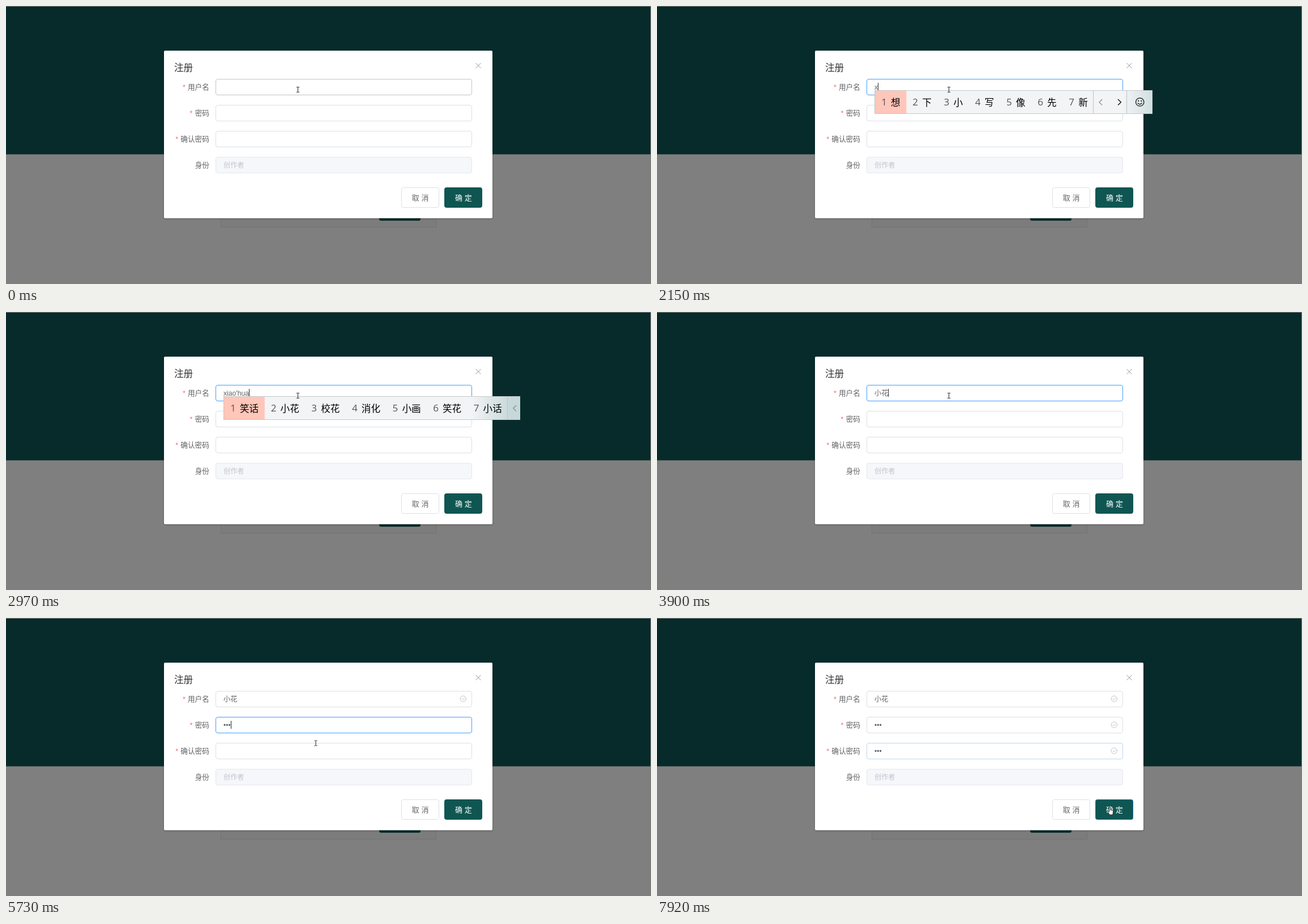
Animation of 1139 by 492 pixels, one loop 8000 ms. Source, as an HTML page:

```html
<!DOCTYPE html>
<html lang="zh-CN">
<head>
<meta charset="utf-8">
<title>注册</title>
<style>
  html, body { margin: 0; width: 100%; height: 100%; overflow: hidden; background: #7f7f7f; }
  svg { display: block; }
  text { font-family: Arial, "Liberation Sans", "Noto Sans CJK SC", "Noto Sans CJK", sans-serif; font-size: 12.2px; fill: #606266; white-space: pre; }
  .title { font-size: 16.6px; fill: #303133; }
  .label { font-size: 12.7px; text-anchor: end; }
  .star { font-size: 12.7px; fill: #f56c6c; }
  .btn { font-size: 13px; letter-spacing: 3.8px; }
  .num, .cand { font-family: "Open Sans", "Noto Sans CJK SC", "Noto Sans CJK", sans-serif; font-size: 17px; fill: #555; }
  .num { text-anchor: middle; }
  .cand { font-size: 16.6px; fill: #000; }
  .box { fill: #fff; stroke: #dcdfe6; }
  .line { fill: none; stroke-linecap: round; stroke-linejoin: round; }
  .tick { stroke: #c0c4cc; }
  .beam { stroke: #222; stroke-width: 1; fill: none; }
</style>
</head>
<body>
<svg id="stage" width="1139" height="492" viewBox="0 0 1139 492">
  <defs>
    <linearGradient id="acrylic" gradientUnits="userSpaceOnUse" x1="822" y1="0" x2="892" y2="0">
      <stop stop-color="#f3f4f6"/><stop offset="1" stop-color="#c6d8d9"/>
    </linearGradient>
    <clipPath id="barClip"><rect id="barEdge" x="384" y="149" height="42"/></clipPath>
    <filter id="shadow" x="-5%" y="-5%" width="110%" height="110%">
      <feDropShadow dx="0" dy="1" stdDeviation="1.5" flood-opacity=".35"/>
    </filter>
  </defs>

  <rect y="1" width="1138" height="261.5" fill="#072b2a"/>
  <rect x="379.5" y="340.5" width="380" height="51" fill="#7c7c7c" stroke="#737373"/>
  <rect x="659" y="350" width="73" height="30" rx="3" fill="#082b29"/>
  <rect x="279" y="79" width="580" height="296.5" rx="2" fill="#fff" filter="url(#shadow)"/>

  <text class="title" x="297" y="115.4">注册</text>
  <path class="line" stroke="#909399" d="M829.8 101.3l8.4 8.4m0-8.4l-8.4 8.4"/>
  <g id="form"></g>

  <rect class="box" x="698.5" y="321.5" width="66" height="35" rx="3"/>
  <text class="btn" x="716.7" y="344">取消</text>
  <rect id="ok" x="774.5" y="321.5" width="66" height="35" rx="3" fill="#0f5652"/>
  <text class="btn" x="793" y="344" style="fill:#fff;font-weight:500">确定</text>

  <rect id="caret" width="1" height="14" fill="#222"/>
  <g id="bar" clip-path="url(#barClip)"></g>

  <g id="beam" class="beam"><path d="M-2.5 -4.5h2m1 0h2M-2.5 4.5h2m1 0h2M0 -4.5v9"/></g>
  <path id="arrow" d="M0 0v11l2.6-2.3 1.7 3.8 1.7-.8-1.6-3.6h3.4z" fill="#fff" stroke="#000" stroke-width=".8"/>
  <g id="deny" fill="none" stroke="#222" stroke-width="1.4"><circle r="4.3"/><path d="M-3-3l6 6"/></g>
  <path id="hand" fill="#fff" stroke="#111" stroke-width=".8" stroke-linejoin="round"
    d="M-2.4-6.2c1-1 2 0 2 .8v3.2l3.6.8c1.2.4 1.6 1.2 1.4 2.4l-.9 5.2h-5.2l-3.4-4.6c-.4-1 .7-1.7 1.5-1l1.1.9v-7z"/>
</svg>
<script>
const $ = id => document.getElementById(id);
const LOOP = 8000, LEFT = 384, GLYPH = 16.4;
const HOVER = '#c0c4cc', IDLE = '#dcdfe6', FOCUS = '#409eff';
const fieldTop = i => 129 + i * 46;

$('form').innerHTML = ['用户名', '密码', '确认密码', '身份'].map((name, i) => {
  const y = fieldTop(i), locked = i === 3;
  const star = locked ? '' : `<text class="star" x="${350 - name.length * 12.7}" y="${y + 19}">*</text>`;
  return `${star}<text class="label" x="359" y="${y + 19.2}">${name}</text>
    <rect id="box${i}" class="box" x="370.5" y="${y + .5}" width="452" height="28" rx="3.5"
      ${locked ? 'style="fill:#f5f7fa;stroke:#e4e7ed"' : ''}/>
    <text id="value${i}" x="${LEFT}" y="${y + (i % 3 ? 18.5 : 18.9)}" ${locked ? 'style="fill:#c0c4cc"' : ''}>${locked ? '创作者' : ''}</text>
    <g id="tick${i}" class="line tick" transform="translate(807.3 ${y + 14})" visibility="hidden">
      <circle r="5.2"/><path d="M-2.6 .1l1.9 1.9 3.4-3.6"/></g>`;
}).join('');

const grin = (x, y) => `<g transform="translate(${x} ${y})"><circle r="9" fill="#ffc83d" stroke="#222" stroke-width="1.3"/>
  <ellipse cx="-3" cy="-2.5" rx="1.3" ry="1.9"/><ellipse cx="3" cy="-2.5" rx="1.3" ry="1.9"/>
  <path d="M-5.3 1.2h10.6a5.3 5.3 0 0 1-10.6 0z" fill="#fff" stroke="#222"/></g>`;

// Input method bar: numbered candidates, then page arrows and a smiley button
function barMarkup(words) {
  let x = LEFT, items = '', first = 0;
  words.split(' ').forEach((word, i) => {
    const face = word === ':D';
    const width = 38.8 + (face ? 23 : word[0] === '(' ? 57.2 : word.length * GLYPH);
    if (!i) first = width + 1.2;
    items += `<text class="num" x="${x + 17}" y="176.4">${i + 1}</text>` +
      (face ? grin(x + 40, 170.3) : `<text class="cand" x="${x + 29}" y="176.8">${word}</text>`);
    x += width;
  });
  const end = Math.round(x + 105) - LEFT, sep = Math.round(x) + .5;
  return `<rect x="384.5" y="149.5" width="${end - 1}" height="41" fill="url(#acrylic)" stroke="#c3c9cb"/>
    <rect x="385" y="150" width="${first - 1}" height="40" fill="#ffc6ba"/>${items}
    <path d="M${sep} 150v40m59-40v40" stroke="#b4c6c7"/>
    <path class="line" d="M${x + 15.5} 165.5l-5 4.8 5 4.8" stroke="#888" stroke-width="1.2"/>
    <path class="line" d="M${x + 44} 165.5l5 4.8-5 4.8" stroke="#111" stroke-width="1.4"/>
    <g transform="translate(${x + 82.3} 170)"><circle r="7.2" fill="none" stroke="#111" stroke-width="1.3"/>
      <circle cx="-2.6" cy="-2" r="1.1"/><circle cx="2.6" cy="-2" r="1.1"/>
      <path class="line" d="M-3.6 1.8q3.6 4 7.2 0" stroke="#111" stroke-width="1.2"/></g>`;
}

// Each step changes part of the state at its time in ms
const start = {
  text: ['', '', ''], edge: [HOVER, IDLE, IDLE], caret: -1, ticks: 0,
  words: '', clip: 1139, cursor: ['beam', 515.5, 148], ok: '#0f5652'
};
const type = (field, value, more) => s => ({ text: s.text.map((v, i) => i === field ? value : v), caret: field, ...more });
const move = (kind, x, y, more) => () => ({ cursor: [kind, x, y], ...more });
const set = more => () => more;
const steps = [
  [120, set({ caret: 0, edge: ['#80b2e8', IDLE, IDLE] })],
  [240, set({ edge: [FOCUS, IDLE, IDLE] })],
  [610, set({ caret: -1 })],
  [860, type(0, 'x')],
  [1110, type(0, 'xi')],
  [1500, type(0, '')],
  [1620, set({ caret: -1 })],
  [2150, type(0, 'x', { words: '想 下 小 写 像 先 新' })],
  [2300, type(0, 'xia', { words: '下 夏 吓 虾 瞎 霞 侠' })],
  [2420, type(0, 'xiao', { words: '笑 小 销 :D (*^_^*) 晓 萧' })],
  [2820, type(0, "xiao'h", { words: '小孩 笑话 小号 消耗 小河 小红 销毁' })],
  [2970, type(0, "xiao'hua", { words: '笑话 小花 校花 消化 小画 笑花 小话', clip: 908 })],
  [3090, set({ clip: 1139 })],
  [3620, set({ caret: -1 })],
  [3900, type(0, '小花', { words: '' })],
  [4180, move('beam', 518.5, 152, { caret: -1 })],
  [4300, move('arrow', 530, 162)],
  [4420, move('beam', 541.5, 180)],
  [4540, move('beam', 547, 185)],
  [4660, set({ caret: 1, ticks: 1 })],
  [4810, set({ edge: [IDLE, FOCUS, IDLE] })],
  [5180, type(1, '•')],
  [5460, type(1, '••')],
  [5610, type(1, '•••', { cursor: ['beam', 547, 197] })],
  [5730, move('beam', 547, 221.5)],
  [5850, move('beam', 549, 232)],
  [5970, move('beam', 549, 236, { edge: [IDLE, FOCUS, HOVER] })],
  [6120, set({ caret: 2, ticks: 2, edge: [IDLE, '#8fc1f5', '#80b2e8'] })],
  [6240, set({ edge: [IDLE, IDLE, FOCUS] })],
  [6360, type(2, '•')],
  [6610, type(2, '••')],
  [6880, type(2, '•••')],
  [7000, move('deny', 584, 269)],
  [7150, move('arrow', 690, 306)],
  [7270, move('arrow', 767, 332)],
  [7420, move('hand', 791, 341, { caret: -1 })],
  [7540, move('hand', 796.5, 341.5)],
  [7680, move('hand', 801, 342, { ticks: 3 })],
  [7800, set({ edge: [IDLE, IDLE, '#80b8f2'], ok: '#14607c' })],
  [7920, set({ edge: [IDLE, IDLE, '#bfd5ec'], ok: '#1d6c9c' })]
];

const states = [start];
for (const [, change] of steps) {
  const last = states[states.length - 1];
  states.push({ ...last, ...change(last) });
}

const show = (el, on) => el.setAttribute('visibility', on ? 'visible' : 'hidden');

function draw(s) {
  s.text.forEach((value, i) => {
    $('value' + i).textContent = value;
    $('box' + i).style.stroke = s.edge[i];
    show($('tick' + i), i < s.ticks);
  });
  show($('caret'), s.caret >= 0);
  if (s.caret >= 0) {
    const width = s.text[s.caret] ? $('value' + s.caret).getComputedTextLength() : 0;
    $('caret').setAttribute('x', Math.round(LEFT + width));
    $('caret').setAttribute('y', fieldTop(s.caret) + 7);
  }
  $('bar').innerHTML = s.words && barMarkup(s.words);
  $('barEdge').setAttribute('width', s.clip - LEFT);
  $('ok').setAttribute('stroke', s.ok);
  const [kind, x, y] = s.cursor;
  for (const id of ['beam', 'arrow', 'deny', 'hand']) show($(id), id === kind);
  $(kind).setAttribute('transform', `translate(${x} ${y})`);
}

let shown = -1;
function tick() {
  const t = performance.now() % LOOP;
  const index = steps.filter(([time]) => time <= t).length;
  if (index !== shown) draw(states[shown = index]);
  requestAnimationFrame(tick);
}
tick();
</script>
</body>
</html>
```
